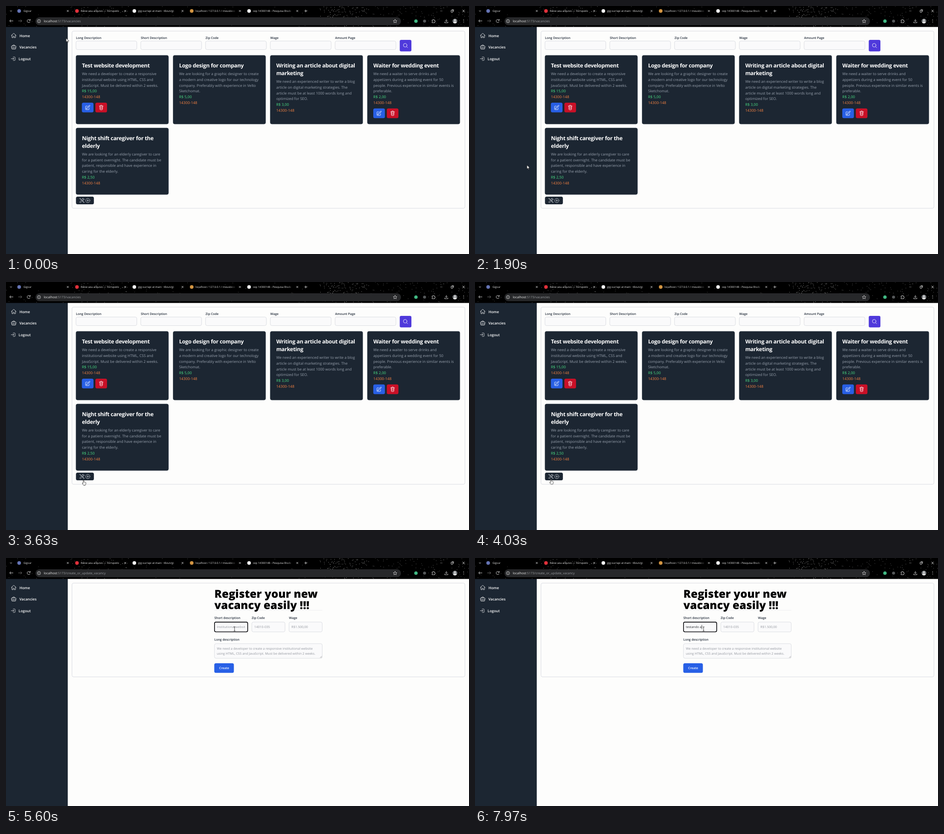
Animation of 1021x549 px, one loop 8000 ms. Source, as an HTML page:

```html
<!DOCTYPE html>
<html lang="en">
<head>
<meta charset="utf-8">
<title>Vacancies</title>
<style>
  html, body { margin: 0; width: 100%; height: 100%; overflow: hidden; background: #fdfdfc; }
  svg { display: block; width: 1021px; height: 549px; }
  text { font: 8.1px "Open Sans", "Noto Sans", sans-serif; text-rendering: geometricPrecision; white-space: pre; }
  .tab { font-size: 5.9px; fill: #e6e6e6; }
  .url { font-size: 7.05px; fill: #9a9da1; }
  .url tspan { fill: #f2f2f2; }
  .menu { font-size: 8px; font-weight: 600; fill: #fff; }
  .label { font-size: 6.9px; font-weight: 600; fill: #1f2937; }
  .name { font-size: 12px; font-weight: 700; letter-spacing: -.025em; fill: #fff; }
  .desc { fill: #98a1ad; }
  .wage, .zip { font-size: 8.2px; }
  .wage { fill: #4be085; }
  .zip { fill: #f58242; }
  .hint { font-size: 7.05px; fill: #92969e; }
  .typed { font-size: 7px; fill: #1f2328; }
  .head { font-size: 24.25px; font-weight: 800; fill: #000; }
  .dark { fill: #1c2632; }
  .field { fill: #fafafb; stroke: #d3d6dc; stroke-width: .8; }
  .panel { fill: none; stroke: #d9dbe1; }
  .icon { fill: none; stroke: #fff; stroke-width: 1.6; stroke-linecap: round; stroke-linejoin: round; }
  .bar { fill: none; stroke: #e3e3e3; stroke-width: .9; }
  .pointer { fill: #fff; stroke: #000; stroke-width: .7; stroke-linejoin: round; }

  .list, .form, .arrow, .hand, .beam, .focus, .hint.first,
  .typed, .cover, .typing, .caret { animation: 8s step-end infinite; }
  .list { animation-name: list; }
  .form { animation-name: form; }
  .arrow { animation-name: arrow; }
  .hand { animation-name: hand; }
  .beam { animation-name: beam; }
  .focus { animation-name: focus; }
  .hint.first { animation-name: hint; }
  .typed, .cover { animation-name: typed; }
  .typing { animation-name: typing; }
  .caret { animation-name: caret; }
  .cursor { animation: move 8s ease-in-out infinite; }

  @keyframes list { 0% { opacity: 1 } 52.5%, 100% { opacity: 0 } }
  @keyframes form { 0% { opacity: 0 } 52.5%, 100% { opacity: 1 } }
  @keyframes arrow { 0% { opacity: 1 } 44.6% { opacity: 0 } 52.5% { opacity: 1 } 61%, 100% { opacity: 0 } }
  @keyframes hand { 0% { opacity: 0 } 44.6% { opacity: 1 } 52.5%, 100% { opacity: 0 } }
  @keyframes beam { 0% { opacity: 0 } 61%, 100% { opacity: 1 } }
  @keyframes focus { 0% { opacity: 0 } 66.25%, 100% { opacity: 1 } }
  @keyframes caret { 0% { opacity: 0 } 66.25% { opacity: 1 } 69.9% { opacity: 0 } 72.5%, 100% { opacity: 1 } }
  @keyframes hint { 0% { opacity: 1 } 72.5%, 100% { opacity: 0 } }
  @keyframes typed { 0% { opacity: 0 } 72.5%, 100% { opacity: 1 } }
  @keyframes typing {
    0% { transform: translateX(0) }
    72.5% { transform: translateX(2.5px) }
    74% { transform: translateX(6.4px) }
    75.4% { transform: translateX(9.7px) }
    77.5% { transform: translateX(12.2px) }
    80% { transform: translateX(16.1px) }
    82% { transform: translateX(20.4px) }
    84.2% { transform: translateX(24.7px) }
    86.4% { transform: translateX(28.9px) }
    92.2% { transform: translateX(30.7px) }
    98.1%, 100% { transform: translateX(34.7px) }
  }
  @keyframes move {
    0%, 1.625% { transform: translate(132.5px, 71px) }
    6.625%, 8.75% { transform: translate(501.5px, 352px) }
    12.5%, 23.75% { transform: translate(114.5px, 352px) }
    24.125%, 34.125% { transform: translate(115px, 354px) }
    36.625%, 41.25% { transform: translate(128px, 385px) }
    45.2%, 48% { transform: translate(171px, 438.5px) }
    50.375%, 52.5% { transform: translate(167.5px, 436.5px) }
    56.25%, 59.625% { transform: translate(486px, 186px) }
    61.75%, 100% { transform: translate(504px, 157px) }
  }
</style>
</head>
<body>
<svg viewBox="0 0 1021 549" xmlns="http://www.w3.org/2000/svg">
  <defs>
    <symbol id="home" viewBox="0 0 24 24"><path d="M2.2 12 11.2 3a1.1 1.1 0 0 1 1.6 0l9 9M4.5 9.8v10.1c0 .6.5 1.1 1.1 1.1h4.1v-4.9c0-.6.5-1.1 1.1-1.1h2.4c.6 0 1.1.5 1.1 1.1V21h4.1c.6 0 1.1-.5 1.1-1.1V9.8"/></symbol>
    <symbol id="case" viewBox="0 0 24 24"><path d="M4.5 7.5h15q2 0 2 2v3q0 2-2 2.3-7.5 2-15 0-2-.3-2-2.3v-3q0-2 2-2ZM3.8 14.5v4q0 2 2 2h12.4q2 0 2-2v-4M8 7.5V5q0-1.7 1.7-1.7h4.6Q16 3.3 16 5v2.5M12 13.2v1"/></symbol>
    <symbol id="exit" viewBox="0 0 24 24"><path d="M12 3.5h6q3 0 3 3v11q0 3-3 3h-6M2 12h13M10.5 7.5 15 12l-4.5 4.5"/></symbol>
    <symbol id="find" viewBox="0 0 24 24"><path d="m21 21-5.2-5.2"/><circle cx="10.5" cy="10.5" r="7.5"/></symbol>
    <symbol id="edit" viewBox="0 0 24 24"><path d="m16.9 4.5 1.7-1.7a1.9 1.9 0 0 1 2.6 2.6L10.6 16.1 6 18l1.9-4.6ZM15.3 6l2.7 2.7M18 14v4.7q0 2.3-2.3 2.3H5.3Q3 21 3 18.7V8.3Q3 6 5.3 6H10"/></symbol>
    <symbol id="bin" viewBox="0 0 24 24"><path d="m14.7 9-.3 9m-4.8 0-.3-9M4 5.8h16m-1.8 0-1 13.9q-.2 2-2.2 2H9q-2 0-2.2-2l-1-13.9m2.7 0V4.3q0-2 2-2h3q2 0 2 2v1.5"/></symbol>
    <symbol id="tools" viewBox="0 0 24 24"><path d="M4 2.5 9.5 8 8 9.5 2.5 4ZM11 11l8.5 10.5q2 0 2-2L12.5 10M21.5 6.5l-3 1-2-2 1-3q-4-.5-5 3.5l.3 2L3 17.5Q1.5 20 4 21t3.5-1.5l9-9q4.5 0 5-4Z"/></symbol>
    <linearGradient id="fade"><stop stop-opacity="0"/><stop offset="1"/></linearGradient>
    <clipPath id="inner"><path d="M464 142h64v21h-64Z"/></clipPath>
  </defs>

  <rect width="1021" height="549" fill="#fdfdfc"/>
  <rect class="dark" y="46" width="136.2" height="503"/>
  <rect width="1021" height="46.4"/>
  <g id="stars" fill="none" stroke="#fff" stroke-width=".9"></g>
  <path d="M22 4h121v15H22Z"/>
  <g id="tabs"></g>

  <g class="bar">
    <path d="m9 10 2 2 2-2M661 8v6m-3-3h6M16 33H8m3-3-3 3 3 3M53 31.5a3.4 3.4 0 1 0 .2 3M53.5 29v3h-3"/>
    <path d="M27 33h8m-3-3 3 3-3 3M957.5 11h5" stroke="#777"/>
    <path d="M981.5 9.5h4v4h-4ZM983 8h4v4M1006.5 8.5l5 5m0-5-5 5"/>
  </g>
  <rect x="65" y="25" width="806" height="17.5" rx="8.7" fill="#27282a"/>
  <g class="bar">
    <circle cx="72.7" cy="33.5" r="3.5"/><path d="M72.7 33v2.2m0-4v1"/>
    <path d="m858 29.5 1.2 2.7 2.9.3-2.2 1.9.7 2.9-2.6-1.5-2.6 1.5.7-2.9-2.2-1.9 2.9-.3Z" stroke-width=".8"/>
    <path d="M939.5 31h2q0-1.5 1-1.5t1 1.5h2v2q1.3 0 1.3 1t-1.3 1v2h-6v-2q1.2-.2 1.2-1t-1.2-1Z"/>
    <path d="M971 29v5m-2.5-2 2.5 2.5 2.5-2.5M967.5 35v2h7v-2"/>
  </g>
  <circle cx="904" cy="33.5" r="3.8" fill="#41b883"/>
  <circle cx="923" cy="33.5" r="3.3" fill="#55585a"/>
  <circle cx="990" cy="33.3" r="5.3" fill="#777b7e"/>
  <path d="M986 37q.5-3 4-3t4 3q-4 3-8 0Z" fill="#ddd"/><circle cx="990" cy="31.5" r="2" fill="#ddd"/>
  <path d="M1009.3 30v1m0 2v1m0 2v1" stroke="#eee" stroke-width="1.2"/>

  <g class="icon">
    <use href="#home" x="10.7" y="59" width="12.7" height="12.7"/>
    <use href="#case" x="10.7" y="84.6" width="12.7" height="12.7"/>
    <use href="#exit" x="10.5" y="111.2" width="11" height="11"/>
  </g>
  <text class="menu" x="29.7" y="68.6">Home</text>
  <text class="menu" x="29.5" y="94.2">Vacancies</text>
  <text class="menu" x="27.8" y="119.7">Logout</text>

  <g class="list">
    <text class="url" x="83.3" y="36"><tspan>localhost</tspan>:5173/vacancies</text>
    <rect class="panel" x="145.5" y="55.5" width="866.5" height="392.3" rx="3.5"/>
    <g id="filters"></g>
    <rect x="868.3" y="75" width="25.7" height="25.5" rx="3.2" fill="#4f39db"/>
    <use class="icon" href="#find" x="874.7" y="81.3" width="12.7" height="12.7"/>
    <g id="cards"></g>
    <rect class="dark" x="154.3" y="422" width="39.5" height="17" rx="3.5"/>
    <g class="icon" style="stroke:#ccd1d8">
      <use href="#tools" x="161.3" y="424.3" width="12.5" height="12.5"/>
      <g stroke-width=".8"><circle cx="180.4" cy="430.6" r="4.7"/><path d="M180.4 428.3v4.6m-2.3-2.3h4.6"/></g>
    </g>
  </g>

  <g class="form">
    <text class="url" x="83.3" y="36"><tspan>localhost</tspan>:5173/create_or_update_vacancy</text>
    <rect class="panel" x="145.5" y="55.5" width="866.5" height="207.7" rx="3.5"/>
    <path d="M459.5 115.7h238" stroke="#e8e9eb" stroke-width=".7"/>
    <text class="head" x="459.5" y="87.8">Register your new</text>
    <text class="head" x="459.5" y="113.3">vacancy easily !!!</text>
    <text class="label" x="459.5" y="134.6">Short description</text>
    <text class="label" x="541.8" y="134.6">Zip Code</text>
    <text class="label" x="624" y="134.6">Wage</text>
    <text class="label" x="459.5" y="182.5">Long description</text>
    <rect class="field" x="459.7" y="141.8" width="73.3" height="21.8" rx="3.5"/>
    <rect class="field" x="542" y="141.8" width="73.3" height="21.8" rx="3.5"/>
    <rect class="field" x="624.1" y="141.8" width="73.3" height="21.8" rx="3.5"/>
    <rect class="field" x="459.7" y="189.7" width="237.7" height="32.3" rx="3.5"/>
    <path d="m692.5 221 4-4m-1.7 4 1.7-1.7" stroke="#777" stroke-width=".6"/>
    <g clip-path="url(#inner)"><text class="hint first" x="465" y="155.2">Institutional website</text></g>
    <text class="hint" x="547.5" y="155.2">14010-035</text>
    <text class="hint" x="629.6" y="155.2">R$1.500,00</text>
    <text class="hint" x="465" y="203.2">We need a developer to create a responsive institutional website</text>
    <text class="hint" x="465" y="213.8">using HTML, CSS and JavaScript. Must be delivered within 2 weeks.</text>
    <text class="typed" x="465" y="155.2">testando a</text>
    <g class="typing">
      <rect class="cover" x="465" y="146" width="33" height="13" fill="#fafafb"/>
      <rect class="caret" x="465" y="148" width=".7" height="9.5"/>
    </g>
    <rect class="focus" x="459.8" y="141.9" width="73.2" height="21.6" rx="3.2" fill="none" stroke="#08080c" stroke-width="1.6"/>
    <rect x="459.3" y="233" width="43.2" height="21.2" rx="3.5" fill="#2860e6"/>
    <text class="label" x="481" y="246.2" text-anchor="middle" style="fill:#fff">Create</text>
  </g>

  <g class="cursor">
    <path class="pointer arrow" d="M0 0v8.7l2-1.8 1.3 3 1.4-.6-1.3-2.9h2.8Z"/>
    <path class="pointer hand" d="M-.9.9a.9.9 0 0 1 1.8 0v3.2l3.3.8q1.3.4 1.1 1.7l-.6 3.2q-.2 1.4-1.4 1.4H.5q-.8 0-1.3-.8L-3 7q.5-1.2 2.1.2Z"/>
    <path class="beam" d="M-2-4.5h1.4q.6 0 .6.6 0-.6.6-.6H2M0-4v8M-2 4.5h1.4q.6 0 .6-.6 0 .6.6.6H2" fill="none" stroke="#111" stroke-width=".8"/>
  </g>
</svg>
<script>
  const fill = (id, html) => { document.getElementById(id).innerHTML = html; };
  const text = (kind, x, y, s) => `<text class="${kind}" x="${x}" y="${y}">${s}</text>`;

  // Starfield behind the browser bar, denser in a few patches
  let seed = 41;
  const rand = () => (seed = seed * 16807 % 2147483647) / 2147483647;
  const starPath = (n, from, to) => {
    let d = '';
    for (let i = 0; i < n; i++) {
      d += `M${(from + rand() * (to - from)).toFixed(1)} ${(rand() * 46).toFixed(1)}h.9`;
    }
    return d;
  };
  fill('stars', [[140, 0, 1021, .5], [70, 140, 270, .7], [130, 690, 800, .85], [70, 800, 1021, .6]]
    .map(([n, a, b, o]) => `<path opacity="${o}" d="${starPath(n, a, b)}"/>`).join(''));

  const tabs = [
    [29, 38.5, '#6574b4', 'Gigvur'],
    [156.5, 165, '#e0303a', 'Baixe seu arquivo — Tornavelo'],
    [283, 291.5, '#f4f4f4', 'gig-vur/api at main · t8zun/gi'],
    [409.5, 418, '#d39542', 'localhost / 127.0.0.1 / meusbico'],
    [536, 544.5, '#f2f2f2', 'cep 14300148 - Pesquisa Brulo']
  ];
  fill('tabs', tabs.map(([cx, x, color, title], i) => {
    const close = 136.3 + i * 126.5;
    const fade = i > 1 ? `<path d="M${x + 76} 4h16v14h-16Z" fill="url(#fade)"/>` : '';
    return `<circle cx="${cx}" cy="11" r="4" fill="${color}"/>` + text('tab', x, 13.2, title) + fade +
      `<path class="bar" d="m${close - 2} 9 4 4m0-4-4 4"/>`;
  }).join(''));

  fill('filters', ['Long Description', 'Short Description', 'Zip Code', 'Wage', 'Amount Page'].map((s, i) => {
    const x = 154.3 + i * 142.85;
    return text('label', x, 73.2, s) +
      `<rect class="field" x="${x}" y="77.5" width="134.2" height="19" rx="3.5"/>`;
  }).join(''));

  const button = (x, y, color, icon) =>
    `<rect x="${x}" y="${y}" width="25.7" height="21.5" rx="3.5" fill="${color}"/>` +
    `<use class="icon" href="#${icon}" x="${x + 6.5}" y="${y + 4.4}" width="12.7" height="12.7"/>`;

  function card(col, row, height, title, lines, wage, owned) {
    const x = 154.3 + col * 214.2, y = 109.2 + row * 160.8, tx = x + 13.2;
    let html = `<rect class="dark" x="${x}" y="${y}" width="204" height="${height}" rx="3.5" stroke="#2b3644" stroke-width=".6"/>`;
    let base = y + 26.8;
    for (const s of title) { html += text('name', tx, base, s); base += 17; }
    for (const s of lines) { html += text('desc', tx, base, s); base += 12.75; }
    html += text('wage', tx, base, wage) + text('zip', tx, base + 12.75, '14300-148');
    if (owned) html += button(tx - .2, base + 22.7, '#285fe4', 'edit') + button(tx + 29.6, base + 22.7, '#c91027', 'bin');
    return html;
  }

  fill('cards', [
    card(0, 0, 152, ['Test website development'],
      ['We need a developer to create a responsive', 'institutional website using HTML, CSS and',
        'JavaScript. Must be delivered within 2 weeks.'], 'R$ 15,00', true),
    card(1, 0, 152, ['Logo design for company'],
      ['We are looking for a graphic designer to create', 'a modern and creative logo for our technology',
        'company. Preferably with experience in Velto', 'Sketchomat.'], 'R$ 5,00'),
    card(2, 0, 152, ['Writing an article about digital', 'marketing'],
      ['We need an experienced writer to write a blog', 'article on digital marketing strategies. The',
        'article must be at least 1000 words long and', 'optimized for SEO.'], 'R$ 3,00'),
    card(3, 0, 152, ['Waiter for wedding event'],
      ['We need a waiter to serve drinks and', 'appetizers during a wedding event for 50',
        'people. Previous experience in similar events is', 'preferable.'], 'R$ 2,00', true),
    card(0, 1, 147.3, ['Night shift caregiver for the', 'elderly'],
      ['We are looking for an elderly caregiver to care', 'for a patient overnight. The candidate must be',
        'patient, responsible and have experience in', 'caring for the elderly.'], 'R$ 2,50')
  ].join(''));
</script>
</body>
</html>
```
